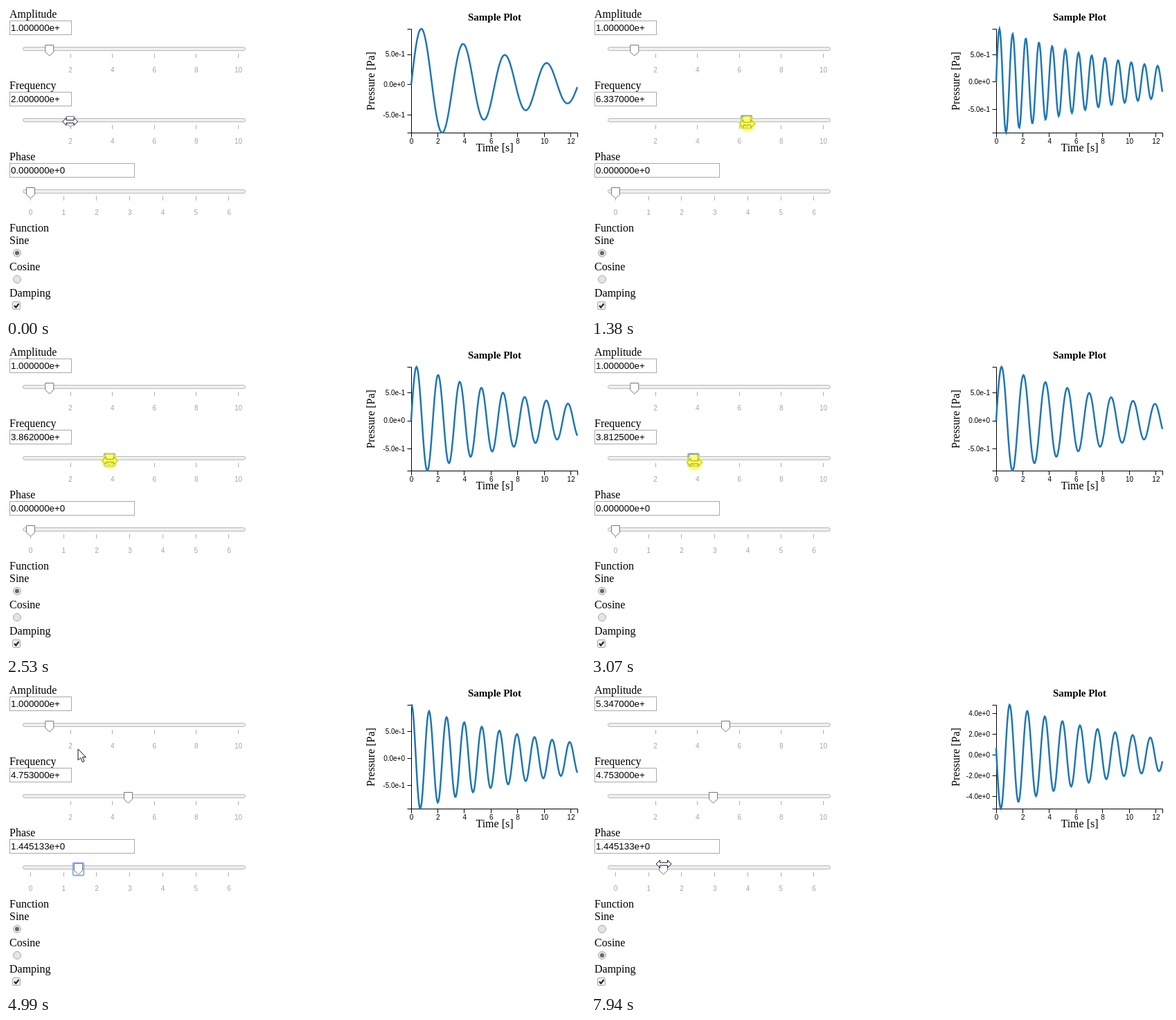
Recreate the animation shown at these times as an HTML page. Size 836 by 448 pixels, loop 8 s.

```html
<!DOCTYPE html>
<html lang="en">
<head>
<meta charset="utf-8">
<title>Sample Plot</title>
<style>
html, body { margin: 0; width: 100%; height: 100%; overflow: hidden; background: #fff; }
svg { display: block; width: 836px; height: 448px; }
text { font: 16px "Liberation Serif", serif; }
.input { font: 13.333px "Liberation Sans", sans-serif; }
.small { font: 10px "Liberation Sans", sans-serif; }
.title { font-size: 15px; font-weight: bold; }
.mid { text-anchor: middle; }
.end { text-anchor: end; }
.grey { fill: #9aaca0; }
</style>
</head>
<body>
<svg id="stage" viewBox="0 0 836 448"></svg>
<script>
const LOOP = 8000, STEP = 77, TAU = 2 * Math.PI;
const stage = document.getElementById('stage');

// Ramps from 0 to 1 between steps a and b
const ramp = (n, a, b) => Math.min(1, Math.max(0, (n - a) / (b - a)));
const easeOut = (n, a, b) => Math.sin(ramp(n, a, b) * TAU / 4);
const within = (n, a, b) => n >= a && n <= b;

// Slider positions from 0 to 1, snapping to half percents
const snap = p => Math.round(p * 200) / 200;
const freqShare = n => n < 4 ? 1.9 / 9.9
  : snap(.2 + .486 * easeOut(n, 9, 22) - .361 * easeOut(n, 24, 38) + .145 * ramp(n, 38, 44));
const phaseShare = n => n < 56 ? 0 : snap(.005 + .225 * ramp(n, 56, 61));
const ampShare = n => n < 69 ? .9 / 9.9 : snap(.1 + .43 * ramp(n, 69, 80));

const range = (from, to, by = 1) =>
  Array.from({ length: Math.floor((to - from) / by) + 1 }, (_, i) => from + i * by);

const text = (x, y, s, cls = '') => `<text x="${x}" y="${y}" class="${cls}">${s}</text>`;
const path = (d, stroke = '#000', fill = 'none', extra = '') =>
  `<path d="${d}" stroke="${stroke}" fill="${fill}" ${extra}/>`;
const rect = (x, y, w, h, stroke, fill, extra = '') =>
  `<rect x="${x}" y="${y}" width="${w}" height="${h}" stroke="${stroke}" fill="${fill}" ${extra}/>`;
const circle = (x, y, r, fill, extra = '') => `<circle cx="${x}" cy="${y}" r="${r}" fill="${fill}" ${extra}/>`;

function slider(row, name, share, min, max, ticks, focused) {
  const top = row * 103, y = top + 62, wide = row === 2;
  const px = v => 35 + 300 * (v - min) / (max - min);
  const x = 35 + 300 * share;
  const shown = (min + (max - min) * share).toExponential(6).slice(0, wide ? 11 : 10);
  return text(5, top + 17, name)
    + rect(5.5, top + 21.5, wide ? 180 : 89, 20, '#a9a9a9', '#fff')
    + text(7, top + 36, shown, 'input')
    + rect(24.5, y - 2.5, 321, 5, '#bbb', '#eee', 'rx="2.5"')
    + ticks.map(v => path(`M${Math.round(px(v)) + .5} ${y + 7}v6`, '#aab2ad')
      + text(px(v) + .5, y + 34, v, 'small mid grey')).join('')
    + path(`M${x - 5.5} ${y - 5.5}v10l6 5.5l6 -5.5v-10z`, '#777', '#fff')
    + (focused ? rect(x - 7.3, y - 6.5, 15.6, 18, '#86a8f0', 'none', 'rx="1.5" stroke-width="1.8"') : '');
}

function radio(y, on) {
  return circle(16, y, 5.5, '#e4e4e4', 'stroke="#aaa"') + (on ? circle(16, y, 3, '#666') : '');
}

function plot(amp, freq, phase, cosine) {
  const wave = cosine ? Math.cos : Math.sin;
  const times = range(0, 250).map(i => i / 20);
  const data = times.map(t => amp * Math.exp(-t / 10) * wave(freq * t + phase));
  const lo = Math.min(...data), hi = Math.max(...data);
  const px = t => 585 + t * 19.2;
  const py = v => 33 + 150 * (hi - v) / (hi - lo);

  // Tick gap of 1, 2 or 5 times a power of ten
  const rough = (hi - lo) / 5, base = 10 ** Math.floor(Math.log10(rough)), err = base / rough;
  const gap = base * (err <= .15 ? 10 : err <= .35 ? 5 : err <= .75 ? 2 : 1);
  const yTicks = range(Math.ceil(lo / gap), Math.floor(hi / gap)).map(i => i * gap);

  return text(705.5, 21, 'Sample Plot', 'title mid')
    + path('M579.5 33.5h6v150h-6M585.5 189.5v-6h240v6')
    + yTicks.map(v => path(`M579.5 ${Math.floor(py(v)) + .5}h6`)
      + text(576, py(v) + 3.2, v.toExponential(1), 'small end')).join('')
    + range(0, 12, 2).map(t => path(`M${Math.floor(px(t)) + .5} 183.5v6`)
      + text(px(t) + .5, 199, t, 'small mid')).join('')
    + path('M' + data.map((v, i) => px(times[i]).toFixed(2) + ' ' + py(v).toFixed(2)).join('L'),
      '#1f77b4', 'none', 'stroke-width="2.5"')
    + text(705.5, 210, 'Time [s]', 'mid')
    + `<g transform="translate(532 108.5) rotate(-90)">${text(0, 0, 'Pressure [Pa]', 'mid')}</g>`;
}

// Pointer stops after the frequency drag: [step, x, y]
const stops = [
  [45, 178, 171], [53, 37, 269], [56, 37, 269], [61, 105, 269], [65, 104, 97],
  [69, 66, 68], [82, 194, 79], [88, 24, 365], [92, 22, 387], [96, 22, 387], [103, 105, 263]
];

function pointerAt(n) {
  if (n <= 45) {
    const sway = 4 * Math.sin(n * Math.PI / 27) ** 2;
    return [35 + 300 * freqShare(n) + sway / 2, 167 + sway];
  }
  const i = Math.max(1, stops.findIndex(s => s[0] >= n));
  const [a, ax, ay] = stops[i - 1], [b, bx, by] = stops[i], u = ramp(n, a, b);
  return [ax + (bx - ax) * u, ay + (by - ay) * u];
}

function pointer(n) {
  const [x, y] = pointerAt(Math.min(n, 103));
  const resize = x > 24 && [62, 165, 268].some(c => Math.abs(y - c) < 20);
  const pressed = within(n, 4, 45) || within(n, 56, 61) || within(n, 69, 82) || within(n, 94, 96);
  const shape = resize
    ? 'm-11 0l5.5 -5.5v3.5h11v-3.5l5.5 5.5l-5.5 5.5v-3.5h-11v3.5z'
    : 'v16l3.7 -3.5l2.7 6.2l2.6 -1.1l-2.7 -6h5.2z';
  return path(`M${x} ${y}${shape}`, '#0a1226', '#fff')
    + (pressed ? circle(x, resize ? y : y + 9, 11.5, '#ff0', 'opacity=".6"') : '');
}

function scene(n) {
  const amp = ampShare(n), freq = freqShare(n), phase = phaseShare(n);
  const cosine = n >= 97, evens = range(2, 10, 2);
  return slider(0, 'Amplitude', amp, .1, 10, evens, within(n, 69, 96))
    + slider(1, 'Frequency', freq, .1, 10, evens, within(n, 4, 55))
    + slider(2, 'Phase', phase, 0, TAU, range(0, 6), within(n, 56, 68))
    + text(5, 326, 'Function')
    + text(5, 344, 'Sine') + radio(357, !cosine)
    + text(5, 382, 'Cosine') + radio(395, cosine)
    + text(5, 420, 'Damping')
    + rect(9.5, 427.5, 11, 11, '#aaa', '#eee', 'rx="1.5"')
    + path('M12 433l2.3 2.6l4.2 -5.4', '#1c2434', 'none', 'stroke-width="2.2"')
    + plot(.1 + 9.9 * amp, .1 + 9.9 * freq, TAU * phase, cosine)
    + pointer(n);
}

let start, last;
function frame(now) {
  start ??= now;
  const n = Math.floor(((now - start) % LOOP + 20) / STEP);
  if (n !== last) stage.innerHTML = scene(last = n);
  requestAnimationFrame(frame);
}
requestAnimationFrame(frame);
</script>
</body>
</html>
```
